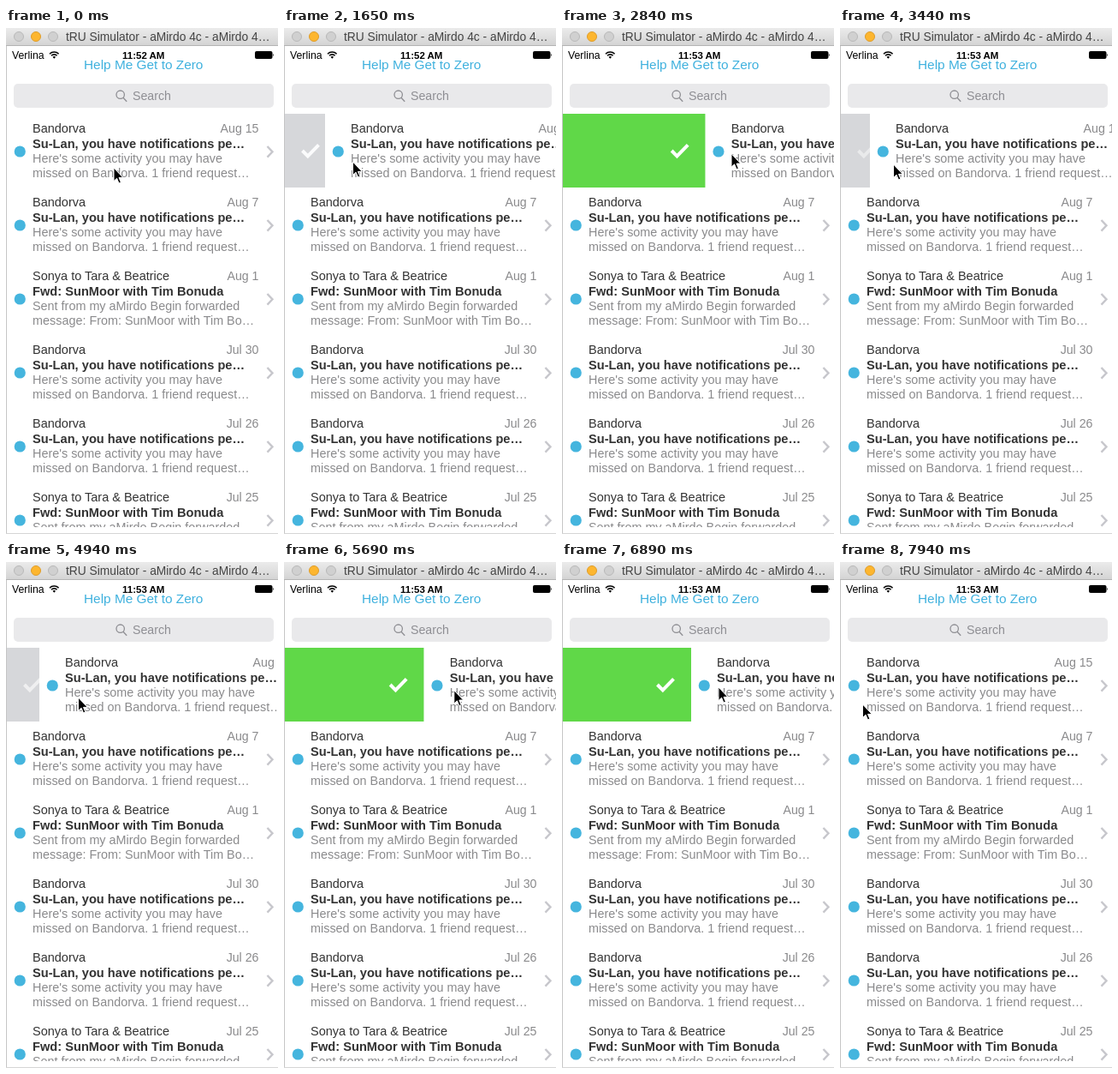
Animation, 318 px wide and 590 px high, one loop 8 s. Source, as an HTML page:

```html
<!DOCTYPE html>
<html lang="en">
<head>
<meta charset="utf-8">
<title>Swipe to sort mail</title>
<style>
  html, body { margin: 0; width: 100%; height: 100%; overflow: hidden; background: #fff; }
  svg { display: block; width: 318px; height: 590px; font-family: "Liberation Sans", Arial, sans-serif; }
  .head { font-size: 14.5px; fill: #333; }
  .bold { font-weight: bold; }
  .subject { font-size: 14.65px; }
  .soft { font-size: 14.4px; fill: #8a8a8c; }
  .date { font-size: 14.2px; fill: #8a8a8c; text-anchor: end; }
  .line { fill: none; stroke: #fff; stroke-width: 4; }
</style>
</head>
<body>
<svg viewBox="0 0 318 590">
  <defs>
    <linearGradient id="bar" x2="0" y2="1">
      <stop offset="0" stop-color="#ebebeb"/>
      <stop offset="1" stop-color="#d4d4d4"/>
    </linearGradient>
    <clipPath id="list"><rect x="1" y="100" width="317" height="482"/></clipPath>
  </defs>
  <rect width="318" height="590" fill="#fff"/>

  <g id="window">
    <rect width="318" height="20" fill="url(#bar)"/>
    <rect y="20" width="318" height="1" fill="#b4b4b4"/>
    <g stroke-width="1">
      <circle cx="15" cy="10" r="5.5" fill="#d0d0d0" stroke="#b9b9b9"/>
      <circle cx="35" cy="10" r="5.5" fill="#fdb62f" stroke="#df9d2a"/>
      <circle cx="55" cy="10" r="5.5" fill="#d0d0d0" stroke="#b9b9b9"/>
    </g>
    <text x="70" y="15" font-size="13.8" fill="#444">tRU Simulator - aMirdo 4c - aMirdo 4…</text>
  </g>

  <g id="status">
    <text x="7" y="36" font-size="12.3">Verlina</text>
    <g fill="none" stroke="#000" stroke-width="1.6">
      <path d="M51 30.2a7.4 7.4 0 0 1 10.6 0"/>
      <path d="M53 32.3a4.6 4.6 0 0 1 6.6 0"/>
    </g>
    <path d="M54.5 33.8a2.6 2.6 0 0 1 3.6 0L56.3 35.8z"/>
    <text id="clock" class="bold" x="136" y="35.5" font-size="11.5">11:52 AM</text>
    <rect x="291" y="27" width="20.5" height="9" rx="2"/>
    <path d="M312.2 29.8q1.6 1.7 0 3.4z"/>
  </g>

  <text x="91" y="48" font-size="15.4" fill="#3fb1de">Help Me Get to Zero</text>

  <g id="search">
    <rect x="9" y="65" width="304" height="28" rx="5" fill="#e9e9eb"/>
    <g fill="none" stroke="#8e8e93" stroke-width="1.3">
      <circle cx="133.7" cy="77.7" r="4.7"/>
      <path d="M137 81.2l4.2 4.6"/>
    </g>
    <text x="148" y="84" font-size="14.2" fill="#8e8e93">Search</text>
  </g>

  <g clip-path="url(#list)">
    <rect id="panel" x="1" y="100" height="86"/>
    <g id="icon">
      <path id="check" class="line" d="M-9 0l6.3 6.3L10-6.7"/>
      <path id="cross" class="line" d="M-8-8L8 8M8-8L-8 8"/>
    </g>
    <g id="rows"></g>
  </g>

  <rect y="21" width="1" height="569" fill="#c6c6c6"/>
  <rect y="589" width="318" height="1" fill="#d6d6d6"/>
  <path id="cursor" d="M0 0V15.5L3.6 12.2 6 18 8.4 17 6 11.4H10.8z" stroke="#fff" stroke-width="1"/>
</svg>

<script>
const $ = id => document.getElementById(id);

const notice = ["Bandorva", "Su-Lan, you have notifications pe…",
  "Here's some activity you may have", "missed on Bandorva. 1 friend request…"];
const forward = ["Sonya to Tara &amp; Beatrice", "Fwd: SunMoor with Tim Bonuda",
  "Sent from my aMirdo Begin forwarded", "message: From: SunMoor with Tim Bo…"];
const mails = [[notice, "Aug 15"], [notice, "Aug 7"], [forward, "Aug 1"],
  [notice, "Jul 30"], [notice, "Jul 26"], [forward, "Jul 25"]];

const row = ([[sender, subject, first, second], date], i) => `
  <g transform="translate(0 ${100 + i * 86})">
    <g class="cell">
      <rect x="1" width="318" height="86" fill="#fff"/>
      <circle cx="16.3" cy="44" r="6.6" fill="#45b5de"/>
      <text class="head" x="31" y="22">${sender}</text>
      <text class="date" x="295.5" y="22">${date}</text>
      <text class="head subject bold" x="31" y="39.5">${subject}</text>
      <text class="soft" x="31" y="57">${first}</text>
      <text class="soft" x="31" y="74">${second}</text>
      <path d="M305.5 38l6 6.3-6 6.3" fill="none" stroke="#c7c7cc" stroke-width="2.4"/>
    </g>
    <rect x="1" y="86" width="317" height="1" fill="#dcdcde"/>
  </g>`;
$("rows").innerHTML = mails.map(row).join("");
const cell = document.querySelector(".cell");

// time, row offset, pointer x, pointer y
const keys = [
  [0, 0, 126, 163], [600, 0, 20.5, 163], [900, 0, 20.5, 163],
  [1650, 47, 80.5, 156], [2240, 137, 177.5, 147], [2690, 200, 234, 144],
  [3140, 100, 126, 152], [3440, 34, 62.5, 159], [3740, 0, 34, 162],
  [4190, 0, 34, 162], [4940, 38, 84.5, 158], [5240, 110, 148, 152],
  [5390, 110, 148, 152], [6290, 268, 300.5, 145], [6440, 268, 300.5, 145],
  [6890, 150, 183, 146], [7040, 150, 183, 146], [7490, 0, 51.5, 147],
  [7640, 0, 51.5, 147], [7940, 0, 26.5, 166], [8000, 0, 26.5, 166]
];
const LOOP = 8000, STEP = 150;

// The screen refreshes in ticks; one tick is 10 ms short.
function tick(t) {
  const shift = t < 2090 ? 0 : 140;
  return Math.floor((t - shift) / STEP) * STEP + shift;
}

function pose(t) {
  const i = keys.findIndex(k => k[0] > t);
  const a = keys[i - 1], b = keys[i];
  const p = (t - a[0]) / (b[0] - a[0]);
  return a.slice(1).map((v, n) => v + (b[n + 1] - v) * p);
}

function draw(now) {
  const t = tick(now % LOOP);
  const [offset, x, y] = pose(t);
  const far = offset > 240;
  cell.setAttribute("transform", `translate(${offset} 0)`);
  $("panel").setAttribute("width", offset);
  $("panel").setAttribute("fill", far ? "#e63b1a" : offset > 60 ? "#60d848" : "#d6d7da");
  $("icon").setAttribute("transform", `translate(${Math.max(30.5, offset - 29.5)} 143)`);
  $("icon").setAttribute("opacity", Math.min(1, Math.max(0, (offset - 20) / 30)));
  $("check").setAttribute("visibility", far ? "hidden" : "visible");
  $("cross").setAttribute("visibility", far ? "visible" : "hidden");
  $("cursor").setAttribute("transform", `translate(${x} ${y})`);
  $("clock").textContent = t < 2690 ? "11:52 AM" : "11:53 AM";
}

const start = performance.now();
function run() {
  draw(performance.now() - start);
  requestAnimationFrame(run);
}
run();
</script>
</body>
</html>
```
